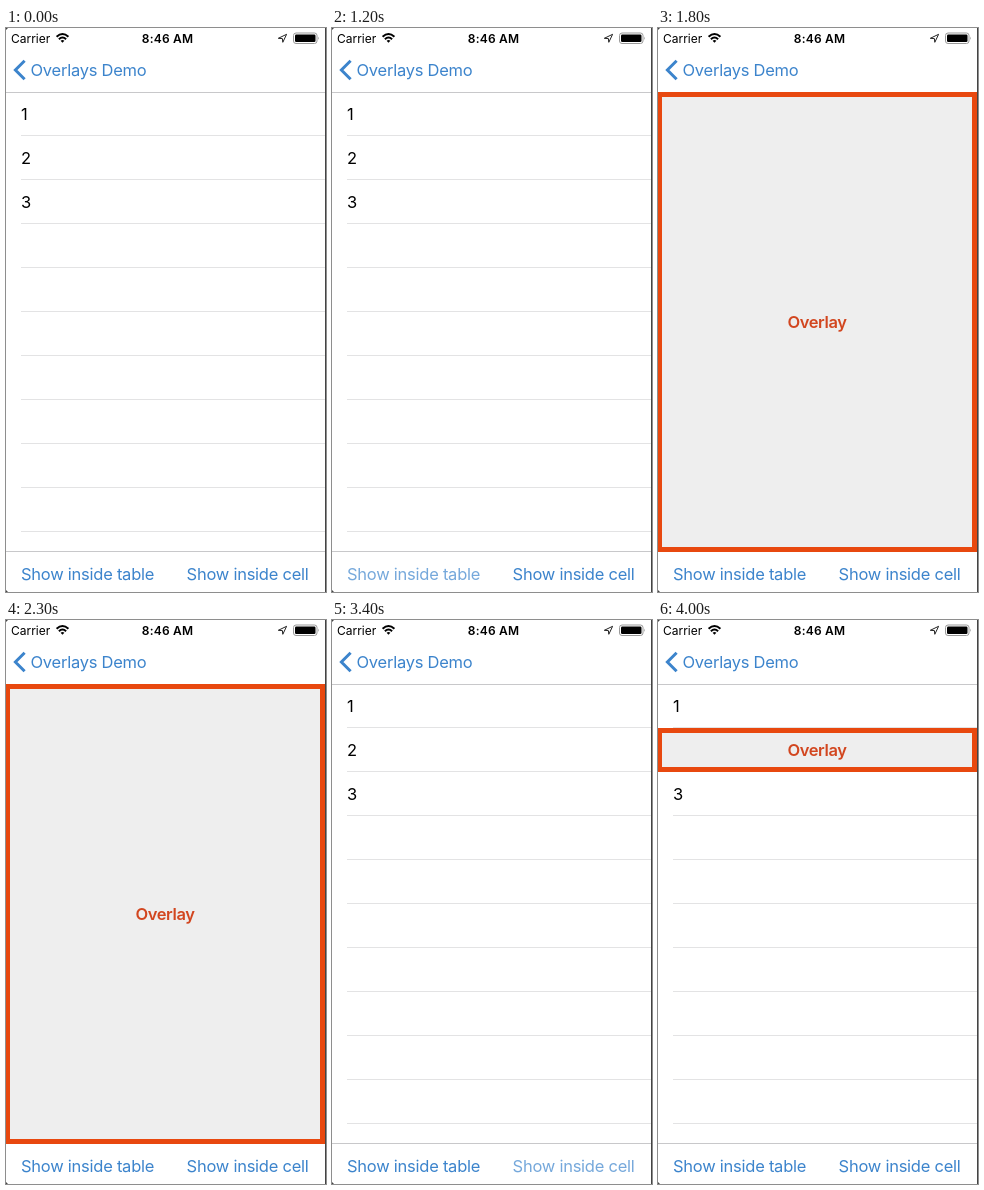
Animation, 320 px wide and 564 px high, one loop 4.5 s. Source, as an HTML page:

```html
<!DOCTYPE html>
<html lang="en">
<head>
<meta charset="utf-8">
<title>Overlays Demo</title>
<style>
  html, body { margin: 0; width: 100%; height: 100%; overflow: hidden; background: #fff; }
  svg { display: block; width: 320px; height: 564px; }
  text { font-family: Inter, "Liberation Sans", sans-serif; font-size: 16.5px; letter-spacing: -.25px; }
  .status { font-size: 12px; letter-spacing: 0; }
  .time { font-weight: 600; letter-spacing: .2px; text-anchor: middle; }
  .link { fill: #3c84cc; }
  .overlay rect { fill: #eee; stroke: #e8480f; stroke-width: 5; }
  .overlay text { fill: #d2461f; font-weight: 600; letter-spacing: -.4px; text-anchor: middle; }
</style>
</head>
<body>
<svg viewBox="0 0 320 564">
  <rect width="320" height="564" fill="#fff"/>

  <text class="status" x="5" y="14.5">Carrier</text>
  <g fill="none" stroke="#000" stroke-width="2">
    <path d="M50.6 8.8Q56.5 3.2 62.4 8.8"/>
    <path d="M52.9 11.2Q56.5 7.8 60.1 11.2"/>
  </g>
  <path d="M54.6 12.7Q56.5 11.1 58.4 12.7L56.5 14.7Z"/>
  <text class="status time" x="161.5" y="14.5">8:46 AM</text>
  <path d="M272.3 10.3L280.6 6.3L276.8 14.3L276.4 10.6Z" fill="none" stroke="#222" stroke-linejoin="round"/>
  <rect x="287.5" y="5" width="23.5" height="10.5" rx="2.5" fill="none" stroke="#999"/>
  <rect x="289" y="6.5" width="20.5" height="7.5" rx="1.2"/>
  <path d="M312.2 8.5Q313.8 10.2 312.2 12Z" fill="#999"/>

  <path d="M18.6 32.8L9.4 42L18.6 51.2" fill="none" stroke="#3c84cc" stroke-width="3"/>
  <text class="link" x="24.5" y="48">Overlays Demo</text>
  <path d="M0 64.5H320M0 523.5H320" stroke="#c8c8ca"/>

  <g id="rows"></g>

  <g id="full" class="overlay">
    <rect x="1.5" y="66.5" width="315" height="455"/>
    <text x="159" y="300">Overlay</text>
  </g>
  <g id="cell" class="overlay">
    <rect x="1.5" y="110.5" width="315" height="39"/>
    <text x="159" y="136">Overlay</text>
  </g>

  <text id="tableBtn" class="link" x="15" y="552">Show inside table</text>
  <text id="cellBtn" class="link" x="302.5" y="552" text-anchor="end">Show inside cell</text>

  <path d="M319.5 0V564" stroke="#444"/>
  <path d="M0 0H2L0 2ZM0 564V562L2 564Z" fill="#444"/>
</svg>
<script>
  const LOOP = 4500;
  const $ = id => document.getElementById(id);

  // Opacity of each part as [start ms, value], held until the next entry.
  const press = at => [1, .85, .7, .7, .8, .92, 1].map((v, i) => [i ? at + (i - 1) * 100 : 0, v]);
  const steps = {
    full: [[0, 0], [1300, 1], [2400, 0]],
    cell: [[0, 0], [3500, 1]],
    tableBtn: press(1000),
    cellBtn: press(3200)
  };

  let rows = '';
  for (let i = 0; i < 10; i++) {
    const y = 107.5 + i * 44;
    rows += `<path d="M15 ${y}H320" stroke="#e3e3e4"/>`;
    if (i < 3) rows += `<text x="15" y="${y - 15.5}">${i + 1}</text>`;
  }
  $('rows').innerHTML = rows;

  function draw(now) {
    const t = now % LOOP;
    for (const id in steps) {
      let value = 0;
      for (const [at, v] of steps[id]) if (t >= at) value = v;
      $(id).style.opacity = value;
    }
  }

  const start = performance.now();
  function tick() {
    draw(performance.now() - start);
    requestAnimationFrame(tick);
  }
  tick();
</script>
</body>
</html>
```
